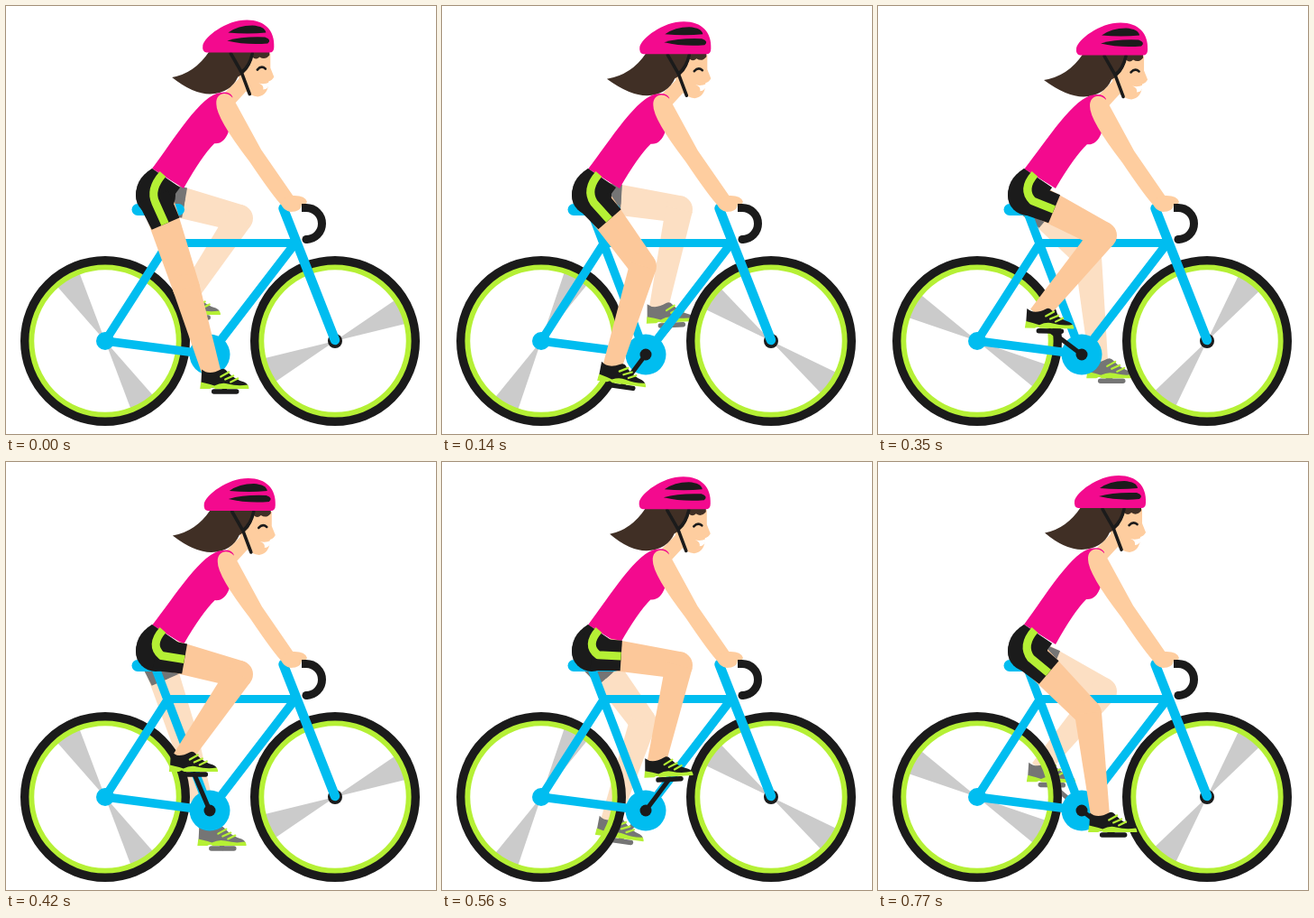
These frames come from a looping animation (477 px wide and 474 px high, 840 ms). An HTML page:

```html
<!DOCTYPE html>
<html lang="en">
<head>
<meta charset="utf-8">
<title>Cyclist</title>
<style>
html, body { margin: 0; width: 100%; height: 100%; overflow: hidden; background: #fff; }
svg { display: block; width: 100vw; height: 100vh; }
</style>
</head>
<body>
<svg id="stage" viewBox="0 0 477 474"></svg>
<script>
const STEP = 70, STEPS = 12;
const BLACK = '#1b1b1b', LIME = '#b5f035', BLUE = '#00bdf0', PINK = '#f30a8e',
      SKIN = '#fecd9f', HAIR = '#402f25', GREY = '#cbcbcb';
const NEAR = { skin: '#fcc89a', dark: BLACK, phase: 0 };
const FAR = { skin: '#fcdfc3', dark: '#757575', phase: 4 };
const HIP = [166, 210], CRANK = [226, 386], CRANK_LENGTH = 44;

// One pedal turn: knee position and foot tilt at each step
const KNEES = [[200, 312], [216, 297], [223, 288], [230, 281], [241, 269], [250, 254],
               [259, 235], [262, 223], [263, 225], [258, 240], [247, 258], [233, 278]];
const TILTS = [0, 4, 8, 11, 6, 1, 0, -1, -3, -3, -1, 0];

const rad = deg => deg * Math.PI / 180;
const polar = ([x, y], r, deg) => [x + r * Math.cos(rad(deg)), y + r * Math.sin(rad(deg))];
const angle = (a, b) => Math.atan2(b[1] - a[1], b[0] - a[0]) * 180 / Math.PI;
const fill = (d, color) => `<path d="${d}" fill="${color}"/>`;
const line = (d, color, width, cap = 'round') =>
  `<path d="${d}" fill="none" stroke="${color}" stroke-width="${width}" stroke-linecap="${cap}" stroke-linejoin="round"/>`;
const disc = ([x, y], r, color) => `<circle cx="${x}" cy="${y}" r="${r}" fill="${color}"/>`;
const ring = ([x, y], r, color, width) =>
  `<circle cx="${x}" cy="${y}" r="${r}" fill="none" stroke="${color}" stroke-width="${width}"/>`;
const group = (transform, content) => `<g transform="${transform}">${content}</g>`;

// Tapered segment between two points
function taper(a, b, ra, rb, color) {
  const dir = angle(a, b);
  const corners = [polar(a, ra, dir - 90), polar(b, rb, dir - 90), polar(b, rb, dir + 90), polar(a, ra, dir + 90)];
  return fill('M' + corners.join('L') + 'Z', color);
}

function wheel(hub, deg) {
  const wedge = dir => fill(`M${hub}L${polar(hub, 80, dir - 10.3)}A80 80 0 0 1 ${polar(hub, 80, dir + 10.3)}Z`, GREY);
  return wedge(deg) + wedge(deg + 180) + ring(hub, 82, LIME, 6.5) + ring(hub, 89.3, BLACK, 9.4);
}

function shoe(dark) {
  return fill('M-26-24Q-18-17-5-24Q-1-26 2-22Q10-13 21-10Q26-8 25-4L-27-4Z', dark) +
    fill('M-27-10Q-18-8-12-6Q-4-10 3-8Q14-5 25-7Q27-3 26-2.5L-11-2.5L-14-4L-17-2.5L-28-2.5Z', LIME) +
    line('M4-21L-5-16M9-17L0-13M14-14L6-10', LIME, 2.2);
}

function leg(pose, { skin, dark, phase }) {
  const knee = KNEES[pose], tilt = TILTS[pose];
  const pedal = polar(CRANK, CRANK_LENGTH, 67 + 30 * pose + phase);
  const ankle = polar(pedal, 22, 230 + tilt);
  const thigh = angle(HIP, knee) - 5;
  const stripe = `M174 186Q159 203 ${polar(HIP, 8, thigh + 24)}L${polar(HIP, 33, thigh + 5)}`;
  return line(`M${CRANK}L${pedal}`, dark, 5) + disc(CRANK, 6.5, dark) +
    taper(HIP, knee, 18, 15, skin) + disc(knee, 15, skin) + taper(knee, ankle, 15, 10.3, skin) +
    group(`translate(${pedal}) rotate(${tilt})`, line('M-12.5 .5H12.5', dark, 5.5) + shoe(dark)) +
    fill('M162 180L193 201L182 216L145 214C142 200 149 188 162 180Z', dark) +
    disc(HIP, 22, dark) +
    group(`translate(${HIP}) rotate(${thigh})`, fill('M0-15L33-14.5L33 19L0 21Z', dark)) +
    line(stripe, dark === BLACK ? LIME : dark, 9, 'butt');
}

function bike() {
  return line('M146 225.5H191.5', BLUE, 13) +
    line('M165 226L226 386M110 371L226 386M110 371L180 262', BLUE, 9.5) +
    line('M180 262.5H321', BLUE, 9) + line('M321 262.5L226 386', BLUE, 9.5) +
    disc([110, 371], 10, BLUE) + disc(CRANK, 22.5, BLUE) +
    disc([365, 371], 8, BLACK) + line('M307.5 224L365 370', BLUE, 10.5);
}

function head(tip) {
  return fill('M258 52H293L293 68L297 78Q295 82 291 83Q291 98 279 100Q271 99 266 94L254 107L238 100L258 80Z', SKIN) +
    fill(`M225 50Q209 74 ${tip} 78.5Q207 97 226 97Q249 96 257 78Q270 72 273 56Q277 60 281 56Q287 60 292 54V50Z`, HAIR) +
    line('M249 52L261 73L270 97M273 52Q270 66 261 73', BLACK, 3.6) +
    line('M278.5 70Q283 65 287.5 69', BLACK, 2.6) +
    fill('M280 85Q286 87 292 84Q291 92 285 92Q286 87 280 85Z', '#fff') +
    fill('M222 51Q217 50 218 43C220 34 243 15 267 15C287 15 298 27 297 45Q297 51 292 51Z', PINK) +
    fill('M246 29Q257 21 273 21Q287 22 288 29Q268 31 246 29Z', BLACK) +
    fill('M245 38Q262 33 287 34Q295 37 290 41Q266 43 245 38Z', BLACK);
}

const torso = fill('M162 180C186 148 216 97 238 95.5Q248 94 251 100L247 138Q242 153 231 152Q217 166 197 202Z', PINK);
const arm = fill('M233 108C232 94 248 92 254 106L283 159L319 211L307 222Q297 212 270 172Q233 124 233 108Z', SKIN);
const hand = fill('M305 219Q310 209 320 210Q332 210 334 217Q333 220 328 220Q327 228 316 228Q308 227 305 219Z', SKIN);

function draw(step) {
  const dy = 1.75 * (1 + Math.cos(rad(30 * (step - 4.5)))), dx = .6 * dy;
  // Sway growing with the height above a fixed point
  const lean = (x, y) => `translate(${x} ${y}) matrix(1 0 ${-dx / 110} ${1 - dy / 130} 0 0) translate(${-x} ${-y})`;
  const tip = 184 - 2 * Math.sin(rad(30 * step)) - dx / 2;
  return leg((step + 6) % STEPS, FAR) +
    wheel([110, 371], 59 + 30 * step) + wheel([365, 371], 156 + 30 * step) +
    bike() +
    group(`translate(${dx} ${dy})`, head(tip)) +
    group(lean(180, 200), torso) +
    group(lean(320, 218), arm) + hand +
    line('M328 223.5H333A17.5 17.5 0 0 1 333 258.5', BLACK, 9, 'butt') + disc([333, 258.5], 4.5, BLACK) +
    leg(step, NEAR);
}

const stage = document.getElementById('stage');
let shown = -1;
function tick() {
  const step = Math.floor(performance.now() / STEP) % STEPS;
  if (step !== shown) stage.innerHTML = draw(shown = step);
  requestAnimationFrame(tick);
}
tick();
</script>
</body>
</html>
```
